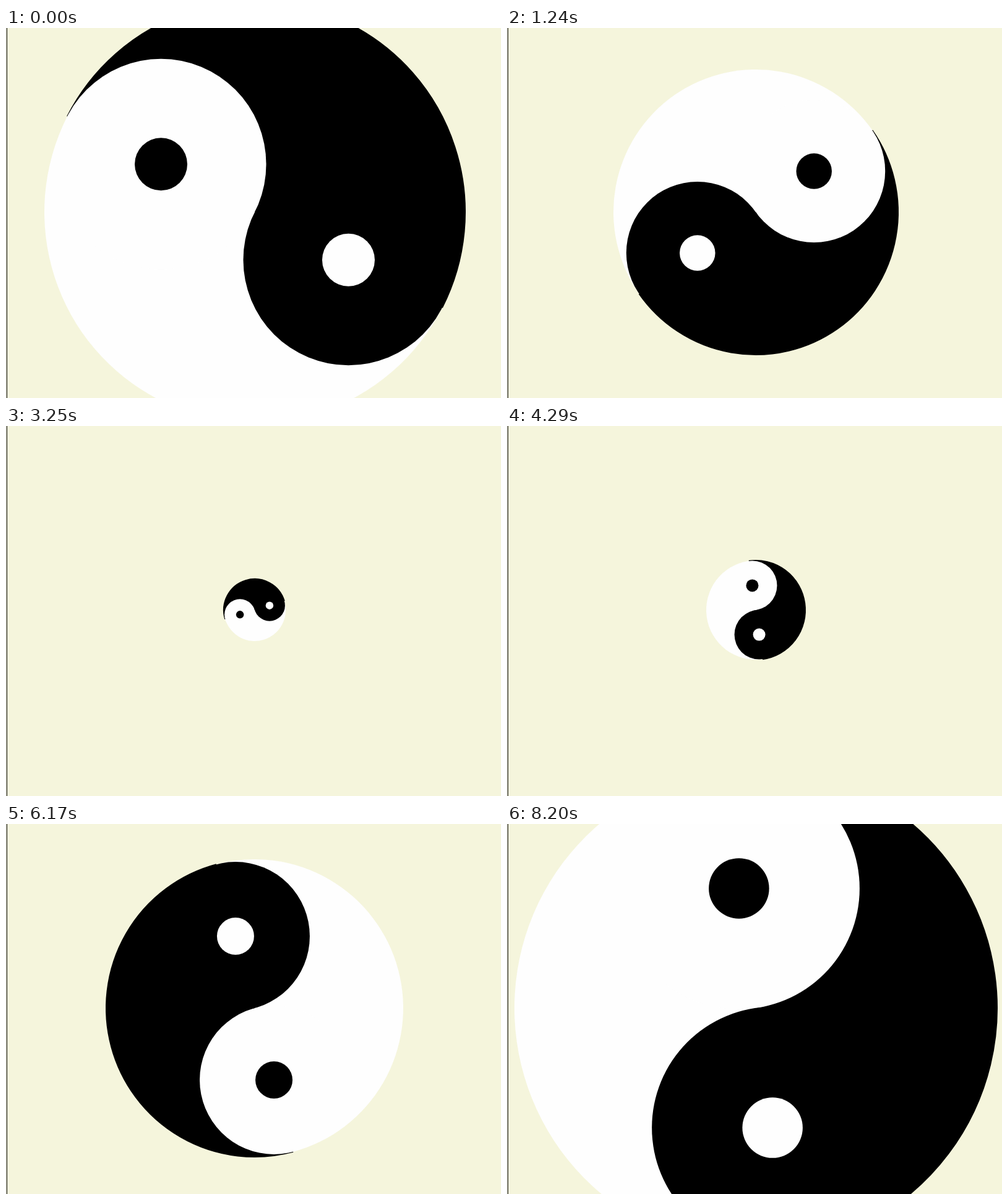
An HTML page with a canvas for the animation above (8.3 s loop, 800 by 597 pixels).

```html
<!DOCTYPE html>
<html lang="en">
<head>
<meta charset="utf-8">
<title>Yin and yang</title>
<style>
  html, body { margin: 0; width: 100%; height: 100%; overflow: hidden; background: #f5f5dc; }
  canvas { display: block; }
</style>
</head>
<body>
<canvas id="stage" width="800" height="597"></canvas>
<script>
const canvas = document.getElementById('stage');
const ctx = canvas.getContext('2d');
const LOOP = 8300, TICKS = 72, PHASE = 0.85;
const CX = 402, CY = 297;
const MIN_RADIUS = 20, MAX_RADIUS = 400, GROWTH = 10;
const TURN = 11, TICKS_PER_TURN = 33;
const BEIGE = '#f5f5dc', WHITE = '#fefefe', BLACK = '#000';

// The symbol moves in whole ticks: it shrinks, grows back and starts to shrink again,
// while it turns by equal angles and restarts upright after each full turn.
function poseAt(t) {
  const tick = Math.min(TICKS - 1, Math.floor(t / LOOP * TICKS + PHASE));
  const grown = MIN_RADIUS + GROWTH * Math.abs(tick - 32);
  const radius = MAX_RADIUS - Math.abs(MAX_RADIUS - grown);
  const degrees = TURN * ((tick + 27) % TICKS_PER_TURN) - 90;
  return { radius, angle: degrees * Math.PI / 180 };
}

function disc(x, y, r, color) {
  ctx.fillStyle = color;
  ctx.beginPath();
  ctx.arc(x, y, r, 0, 2 * Math.PI);
  ctx.fill();
}

function half(r, start, color) {
  ctx.fillStyle = color;
  ctx.beginPath();
  ctx.arc(CX, CY, r, start, start + Math.PI);
  ctx.fill();
}

function draw(t) {
  const { radius, angle } = poseAt(t);
  const dx = Math.cos(angle) * radius / 2;
  const dy = Math.sin(angle) * radius / 2;

  ctx.fillStyle = BEIGE;
  ctx.fillRect(0, 0, canvas.width, canvas.height);

  half(radius, angle + Math.PI, WHITE);
  half(radius, angle, BLACK);
  ctx.strokeStyle = BLACK;
  ctx.lineWidth = 2;
  ctx.stroke();

  disc(CX + dx, CY + dy, radius / 2, WHITE);
  disc(CX - dx, CY - dy, radius / 2, BLACK);
  disc(CX + dx, CY + dy, radius / 8, BLACK);
  disc(CX - dx, CY - dy, radius / 8, WHITE);

  ctx.fillStyle = BLACK;
  ctx.fillRect(1, 0, 1, canvas.height);
}

const began = performance.now();
function loop() {
  draw((performance.now() - began) % LOOP);
  requestAnimationFrame(loop);
}
loop();
</script>
</body>
</html>
```
